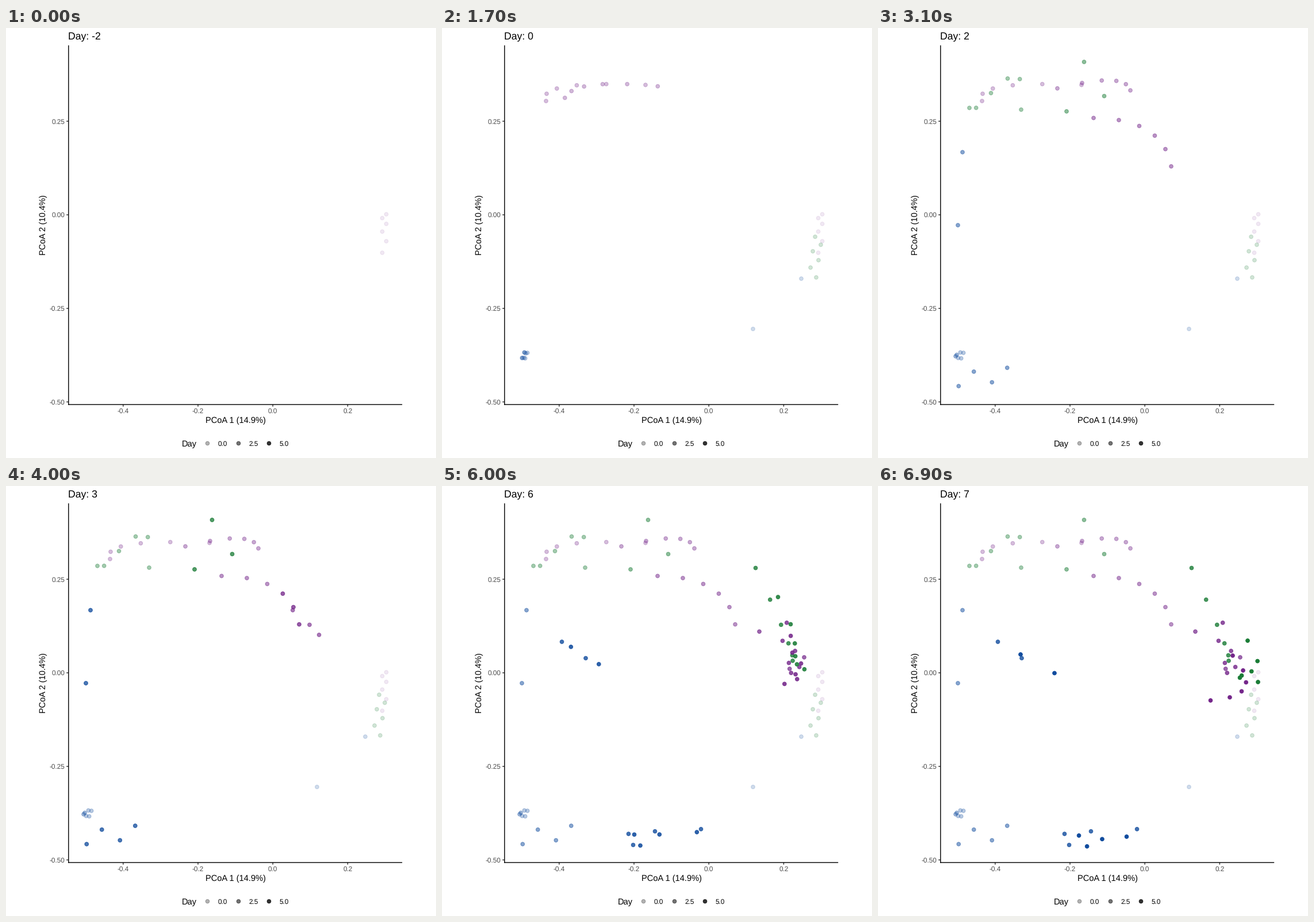
A matplotlib script that plays this animation: 748 px wide and 748 px high, repeating every 7000 ms.

```python
import numpy as np
import matplotlib.pyplot as plt
from matplotlib.animation import FuncAnimation
from matplotlib.colors import to_rgb

SIZE, DPI = 748, 88
FRAMES, INTERVAL = 70, 100
FIRST, LAST = -2, 7
DAYS = [-2, -1, 0, 1, 2, 4, 5, 7]
NONE = np.empty((0, 2))


def arc(n, *keys, zig=0):
    """n samples on the polynomial through keys, stepping aside in turn by zig."""
    keys = np.array(keys, float)
    s, t = np.linspace(0, 1, len(keys)), np.linspace(0, 1, n)
    curve = [np.polyval(np.polyfit(s, k, len(s) - 1), t) for k in keys.T]
    dx, dy = keys[-1] - keys[0]
    side = np.array([dy, -dx]) / np.hypot(dx, dy)
    return np.transpose(curve) + zig * np.outer((-1.0) ** np.arange(n), side)


# Clusters of samples per day; equal positions in a cluster follow each other.
BLUE = {
    -1: arc(2, (625, 436), (541, 523.5)),
    0: arc(4, (148, 570), (140, 569), zig=-5),
    1: arc(2, (137, 568.5), (135, 571)),
    2: np.vstack([arc(4, (226, 602), (139, 612), zig=-11),
                  arc(2, (139, 343), (147, 216))]),
    5: np.vstack([arc(2, (208.5, 271), (250, 299.5)),
                  arc(4, (326, 613), (347, 614), (449, 589), zig=8)]),
    7: np.vstack([arc(2, (248, 293), (307, 325.5)),
                  arc(4, (350, 613), (375, 622), (432, 605), zig=5)]),
}
GREEN = {
    -1: arc(6, (655, 364), (650, 396), (645, 433), zig=-6),
    1: arc(6, (159, 139), (187, 123), (234, 84), (249, 142)),
    2: arc(3, (358.5, 59), (328, 145), (393.5, 118.4)),
    5: arc(6, (545.5, 142.6), (597, 259), (610, 304)),
    7: arc(6, (643, 269), (655, 318), (629, 331), (661, 341)),
}
PURPLE = {
    -2: arc(6, (658, 324), (658, 347), (658, 391), zig=3.5),
    0: arc(6, (181, 127), (215, 102), (354, 99)),
    1: arc(6, (312, 105), (403, 91), (439, 108.5)),
    2: arc(6, (375, 156.5), (469, 178), (510, 240.7)),
    4: arc(3, (630, 298), (552, 253.2), (604.7, 318)),
    5: arc(6, (615, 323), (609, 298), (592, 240), zig=8),
    7: arc(6, (578.5, 373), (638, 350), (617, 295)),
}
GROUPS = [(BLUE, "#114C9E"), (GREEN, "#1A7C36"), (PURPLE, "#74268A")]


def pt(px):
    return px * 72 / DPI


def key_frame(day):
    return round((FRAMES - 1) * (day - FIRST) / (LAST - FIRST))


def alpha(day):
    return 0.1 + 0.9 * (day - FIRST) / (LAST - FIRST)


def dots(day, points, color):
    """Rows of x, y, r, g, b, a."""
    return [(*p, *to_rgb(color), alpha(day)) for p in points]


def tween(series, color, day, following, t):
    """Matched samples glide on; the others wait for the next day."""
    start, end = series.get(day, NONE), series.get(following, NONE)
    n = min(len(start), len(end)) if t else 0
    mid = (1 - t) * start[:n] + t * end[:n]
    moving = dots(day + t * (following - day), mid, color)
    return dots(day, start[n:], color) + moving


def scene(i):
    rows = []
    for day in DAYS:
        if key_frame(day) < i:
            for series, color in GROUPS:
                rows += dots(day, series.get(day, NONE), color)
    k = max(j for j, day in enumerate(DAYS) if key_frame(day) <= i)
    day = DAYS[k]
    following = DAYS[min(k + 1, len(DAYS) - 1)]
    span = key_frame(following) - key_frame(day)
    t = (i - key_frame(day)) / span if span else 0
    for series, color in GROUPS:
        rows += tween(series, color, day, following, t)
    return np.array(rows)


plt.rcParams.update({"font.family": "Liberation Sans",
                     "text.hinting": "none"})
fig = plt.figure(figsize=(SIZE / DPI, SIZE / DPI), dpi=DPI, facecolor="white")
ax = fig.add_axes([0, 0, 1, 1])
ax.set_xlim(0, SIZE)
ax.set_ylim(SIZE, 0)
ax.axis("off")

TITLE, LABEL, SMALL = 17.6, 14.67, 11.73
LEFT, RIGHT, TOP, BOTTOM = 108.8, 689.2, 30.2, 655
TICK = 3.67


def text(x, y, s, size, color="black", ha="left", **kw):
    return ax.text(x, y, s, fontsize=pt(size), color=color, ha=ha,
                   va="baseline", **kw)


def line(xs, ys, color="black"):
    ax.plot(xs, ys, color=color, lw=pt(1.42), solid_capstyle="butt",
            snap=False, zorder=1)


def markers(rows):
    rows = np.array(rows)
    return ax.scatter(rows[:, 0], rows[:, 1], s=pt(2 * 3.32) ** 2,
                      facecolors=rows[:, 2:], edgecolors=rows[:, 2:],
                      linewidths=pt(0.945), zorder=3)


for n in range(4):
    x = 203.8 + 130.2 * n
    line([x, x], [BOTTOM, BOTTOM + TICK], "#333333")
    text(x, 670.2, f"{-0.4 + 0.2 * n + 1e-9:.1f}", SMALL, "#4D4D4D", "center")
    y = 162.2 + 162.75 * n
    line([LEFT - TICK, LEFT], [y, y], "#333333")
    text(102.2, y + 4.2, f"{0.25 - 0.25 * n:.2f}", SMALL, "#4D4D4D", "right")
line([LEFT, LEFT], [TOP, BOTTOM + 0.7])
line([LEFT - 0.7, RIGHT], [BOTTOM, BOTTOM])

text((LEFT + RIGHT) / 2, 687, "PCoA 1 (14.9%)", LABEL, ha="center")
text(69.3, (TOP + BOTTOM) / 2, "PCoA 2 (10.4%)", LABEL, ha="center",
     rotation=90, rotation_mode="anchor")

text(305.7, 727.7, "Day", LABEL)
for n, day in enumerate([0, 2.5, 5]):
    x = 350.5 + 53.4 * n
    markers(dots(day, [(x, 722)], "black"))
    text(x + 18.2, 726.6, f"{day:.1f}", SMALL)

title = text(LEFT - 0.3, 20, "", TITLE)
samples = markers(scene(0))


def update(i):
    rows = scene(i)
    samples.set_offsets(rows[:, :2])
    samples.set_facecolors(rows[:, 2:])
    samples.set_edgecolors(rows[:, 2:])
    now = FIRST + (LAST - FIRST) * i / (FRAMES - 1)
    title.set_text(f"Day: {round(now)}")
    return samples, title


anim = FuncAnimation(fig, update, frames=FRAMES, interval=INTERVAL,
                     repeat=True, repeat_delay=0)
plt.show()
```
